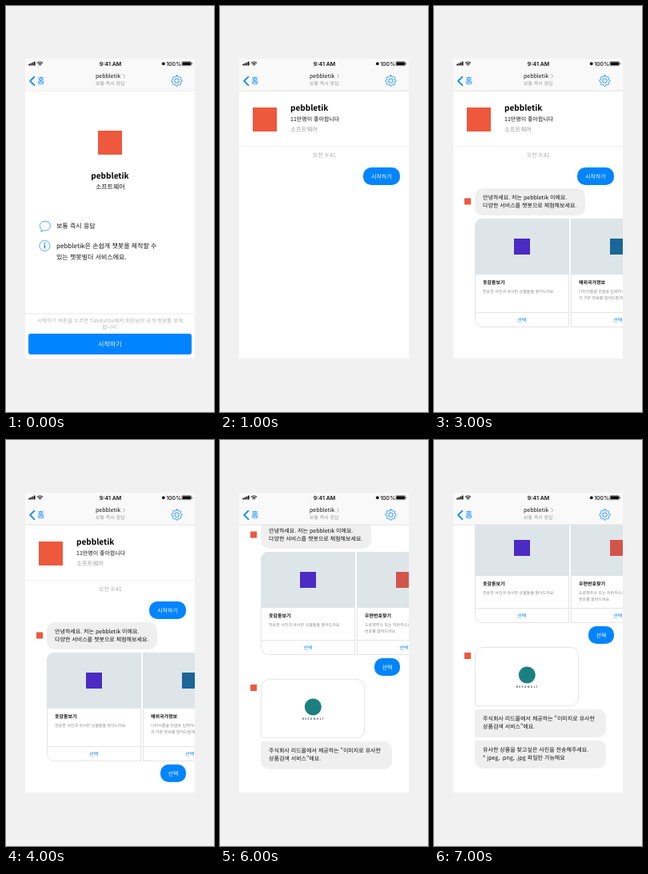
These frames come from a looping animation (260 px wide and 508 px high, 8000 ms). An HTML page:

```html
<!DOCTYPE html>
<html lang="ko">
<head>
<meta charset="utf-8">
<title>Chat demo</title>
<style>
html, body { margin: 0; width: 100%; height: 100%; overflow: hidden; background: #f1f1f1; }
svg { display: block; width: 100vw; height: 100vh; }
text { font-family: "Noto Sans CJK KR", "Noto Sans KR", "Noto Sans CJK", sans-serif; text-rendering: geometricPrecision; white-space: pre; }
.ui { font-family: Inter, sans-serif; }
</style>
</head>
<body>
<svg viewBox="0 0 260 508" xmlns="http://www.w3.org/2000/svg">
  <defs><clipPath id="view"><rect x="24" y="106" width="212" height="335"/></clipPath></defs>
  <rect width="260" height="508" fill="#f1f1f1"/>
  <rect x="24" y="66" width="212" height="375" fill="#fff"/>
  <g id="body" clip-path="url(#view)"></g>
  <g id="bar"></g>
</svg>
<script>
const BLUE = '#0084ff', INK = '#111', GRAY = '#999', RED = '#ee583d', LINE = '#dcdcdc';
const BRAND = 'pebbletik', MAKER = 'REEDMOLT';
const STEP = 1000, STEPS = 8;
const SCROLL = [0, 0, 0, 0, 0, 80, 126, 166];

const text = (x, y, size, str, fill = INK, weight = 400, more = '') =>
  `<text x="${x}" y="${y}" font-size="${size}" fill="${fill}" font-weight="${weight}" ${more}>${str}</text>`;
const mid = (x, y, size, str, fill, weight, more = '') =>
  text(x, y, size, str, fill, weight, 'text-anchor="middle" ' + more);
const rect = (x, y, w, h, fill, r = 0) =>
  `<rect x="${x}" y="${y}" width="${w}" height="${h}" rx="${r}" fill="${fill}"/>`;
const circle = (x, y, r, fill, more = '') => `<circle cx="${x}" cy="${y}" r="${r}" fill="${fill}" ${more}/>`;
const stroke = (d, color, width = 1) =>
  `<path d="${d}" fill="none" stroke="${color}" stroke-width="${width}" stroke-linecap="round" stroke-linejoin="round"/>`;

// Rectangle with its own radius per corner: tl, tr, br, bl
function box(x, y, w, h, [a, b, c, d], fill, line = 'none') {
  return `<path d="M${x + a} ${y}h${w - a - b}a${b} ${b} 0 0 1 ${b} ${b}v${h - b - c}a${c} ${c} 0 0 1 ${-c} ${c}` +
    `h${c + d - w}a${d} ${d} 0 0 1 ${-d} ${-d}v${a + d - h}a${a} ${a} 0 0 1 ${a} ${-a}z" fill="${fill}" stroke="${line}" stroke-width=".8"/>`;
}

function gear(cx, cy) {
  let d = '';
  for (let i = 0; i <= 96; i++) {
    const a = i / 96 * Math.PI * 2;
    const r = 5.9 + .75 * Math.tanh(2.2 * Math.cos(8 * a));
    d += (i ? 'L' : 'M') + (cx + r * Math.sin(a)).toFixed(2) + ' ' + (cy - r * Math.cos(a)).toFixed(2);
  }
  return stroke(d + 'z', BLUE, .9) + circle(cx, cy, 2.7, 'none', `stroke="${BLUE}" stroke-width=".9"`);
}

function topBar(chat) {
  let s = rect(24, 66, 212, 40, '#f9f9f9') + rect(24, 105.6, 212, .9, chat ? '#dedede' : '#ececec');
  for (let i = 0; i < 4; i++) {
    const h = 1.8 + i;
    s += rect(28.3 + i * 2.2, 74.4 - h, 1.7, h, INK, .3);
  }
  s += stroke('M39.4 71.2a4.5 4.5 0 0 1 6.2 0M40.8 72.7a2.5 2.5 0 0 1 3.4 0', INK, 1.1) + circle(42.5, 74, .8, INK);
  s += mid(130.5, 74.9, 7, '9:41 AM', INK, 600, 'class="ui"');
  s += circle(196.8, 72.2, 1.9, INK) + text(200.2, 74.9, 7, '100%', INK, 500, 'class="ui"');
  s += `<rect x="219.9" y="69.7" width="11.6" height="5" rx="1" fill="#fff" stroke="${INK}" stroke-width=".5"/>` +
    rect(220.5, 70.3, 10.4, 3.8, INK, .5) + rect(232.1, 71.3, .8, 1.8, INK, .4);
  s += stroke('M35.4 88.6L30.1 93.9L35.4 99.2', BLUE, 1.7) + text(39, 97.2, 10, '홈', BLUE);
  s += text(112, 90.2, 7, BRAND, INK, 500) + stroke('M146.7 85.7L148.6 87.9L146.7 90.1', GRAY, .8);
  s += text(112, 99.2, 6, '보통 즉시 응답', GRAY);
  return s + gear(213.5, 93.6);
}

function welcome() {
  return rect(115, 156, 30, 30, RED) +
    mid(130, 216, 10, BRAND, '#000', 700) + mid(130.3, 229, 8, '소프트웨어') +
    stroke('M44.6 279.7A6.6 5.9 0 1 1 47.4 280.9L43.8 282z', '#3d9ff5', .9) +
    text(63, 278, 8, '보통 즉시 응답') +
    circle(48.4, 300, 6.5, 'none', 'stroke="#3d9ff5" stroke-width=".9"') +
    circle(48.4, 297, .9, BLUE) + rect(47.7, 298.8, 1.4, 4.6, BLUE) +
    text(63, 303, 8, BRAND + '은 손쉽게 챗봇을 제작할 수') +
    text(63, 317, 8, '있는 챗봇빌더 서비스에요.') +
    rect(24, 384.6, 212, 1, '#e9e9e9') +
    mid(130, 396.4, 6.55, '시작하기 버튼을 누르면 TalkKettle에서 회원님의 공개 정보를 보게', '#b3b3b3') +
    mid(130, 404.4, 6.55, '됩니다.', '#b3b3b3') +
    rect(28, 410, 204, 26, BLUE, 3) + mid(129.8, 426, 8, '시작하기', '#fff', 500);
}

const avatar = y => rect(38, y - 4, 8, 8, RED);
const reply = (x, y, str) =>
  rect(x, y, 225 - x, 22, BLUE, 10) + mid((x + 225) / 2, y + 13.6, 7, str, '#fff', 500);
const bubble = (y, w, h, corners, lines) =>
  box(51, y, w, h, corners, '#efefef') +
  lines.map((l, i) => text(61, y + 14 + i * 10, 7, l, INK, 500)).join('');

function card(x, y, h, corners, color, title, lines) {
  const [tl, tr, br, bl] = corners;
  return box(x + .4, y + .4, 117.2, h - .8, corners, '#fff', LINE) +
    box(x, y, 118, 70, [tl, tr, 0, 0], '#dee5e8') +
    rect(x + 49, y + 25, 20, 20, color) +
    text(x + 10, y + 82, 6, title, INK, 700) +
    lines.map((l, i) => text(x + 10, y + 92.9 + i * 8, 5, l, '#888')).join('') +
    rect(x, y + h - 18.8, 118, .8, LINE) +
    mid(x + 58.7, y + h - 7.2, 6, '선택', BLUE, 500);
}

function chat(step) {
  const late = step > 4, cardH = late ? 129 : 136;
  let s = rect(41, 127, 30, 30, RED) +
    text(88, 131, 10, BRAND, '#000', 700) +
    text(88, 144, 7, '11만명이 좋아합니다', INK, 500) +
    text(88, 156.8, 7.4, '소프트웨어', GRAY) +
    rect(24, 175, 212, .8, '#eee') +
    mid(130.3, 188.7, 7, '오전 9:41', '#aaa') +
    reply(179, 202, '시작하기');
  if (step > 1) s += avatar(244.5) + bubble(228, 138, 34, [10, 10, 10, 10],
    [`안녕하세요. 저는 ${BRAND} 이에요.`, '다양한 서비스를 챗봇으로 체험해보세요.']);
  if (step > 2) {
    s += card(51, 266, cardH, [9, 0, 0, 9], '#4b2bc4', '옷감돋보기', ['전송한 사진과 유사한 상품들을 찾아드려요.']);
    s += late
      ? card(171, 266, cardH, [0, 0, 0, 0], '#d2554c', '우편번호찾기', ['도로명주소 또는 지번주소로 우편', '번호를 알려드려요.'])
      : card(171, 266, cardH, [0, 0, 0, 0], '#1b6599', '해외국가정보', ['나라이름을 한글로 입력하시면 국가', '의 기본 정보를 알려드릴게요.']);
  }
  if (step > 3) s += reply(193, 270 + cardH, '선택');
  if (late) {
    s += avatar(436) + box(51.4, 425.4, 129.2, 73.2, [10, 10, 10, step > 5 ? 2 : 10], '#fff', LINE) +
      circle(116.3, 460, 10.5, '#1c7f80') +
      mid(116.8, 476.3, 3.3, MAKER, '#345', 700, 'letter-spacing="1.35"');
  }
  if (step > 5) s += bubble(503, 164, 35, [2, 10, 10, step > 6 ? 2 : 10],
    ['주식회사 리드몰에서 제공하는 "이미지로 유사한', '상품검색 서비스"에요.']);
  if (step > 6) s += bubble(542, 164, 35, [2, 10, 10, 10],
    ['유사한 상품을 찾고싶은 사진을 전송해주세요.', '* jpeg, .png, .jpg 파일만 가능해요']);
  return `<g transform="translate(0 ${-SCROLL[step]})">${s}</g>`;
}

const bodyEl = document.getElementById('body'), barEl = document.getElementById('bar');
let shown = -1;
function render(ms) {
  const step = Math.floor(ms / STEP) % STEPS;
  if (step === shown) return;
  shown = step;
  bodyEl.innerHTML = step ? chat(step) : welcome();
  barEl.innerHTML = topBar(step > 0);
}

const start = performance.now();
function tick() {
  render(performance.now() - start);
  requestAnimationFrame(tick);
}
tick();
</script>
</body>
</html>
```
